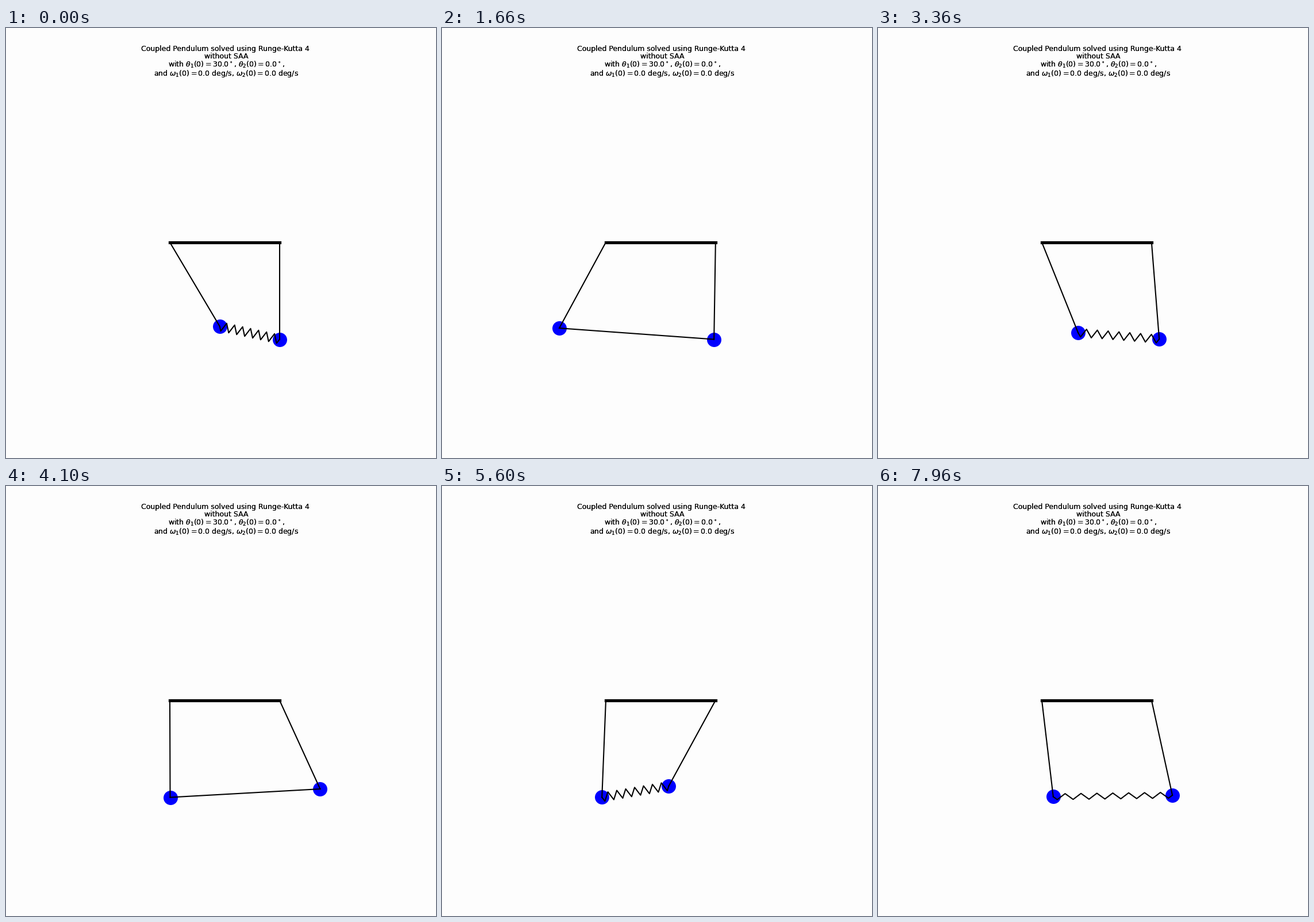
A matplotlib script that plays this animation: 748 px wide and 748 px high, repeating every 8000 ms.

```python
import numpy as np
import matplotlib.pyplot as plt
from matplotlib.animation import FuncAnimation

SIZE = 748
FPS, STATES = 30, 240        # rate and number of solved states
TICK, LOOP = 20, 8000        # ms
G, K = 3.0, 0.905            # g / length and spring constant / mass
GAP = 1.1                    # distance between the pivots, in rod lengths
NODES, WIRE = 15, 0.1        # coils of the spring and wire length per coil
BACK = "#fdfdfd"

# title lines with their baselines, in pixels from the top
TITLE = [("Coupled Pendulum solved using Runge-Kutta 4 ", 40.0),
         ("without SAA", 53.3),
         (r"with $\theta_1(0) = 30.0^\circ$, $\theta_2(0) = 0.0^\circ$,", 67.7),
         (r"and $\omega_1(0) = 0.0$ deg/s, $\omega_2(0) = 0.0$ deg/s", 83.5)]


def slope(state):
    a, b, va, vb = state
    pull = K * (np.sin(a) - np.sin(b))
    return np.array([va, vb,
                     -G * np.sin(a) - pull * np.cos(a),
                     -G * np.sin(b) + pull * np.cos(b)])


def rk4(state, dt):
    k1 = slope(state)
    k2 = slope(state + dt / 2 * k1)
    k3 = slope(state + dt / 2 * k2)
    k4 = slope(state + dt * k3)
    return state + dt / 6 * (k1 + 2 * k2 + 2 * k3 + k4)


def solve():
    states = [np.array([np.radians(30.0), 0.0, 0.0, 0.0])]
    for _ in range(STATES - 1):
        states.append(rk4(states[-1], 1 / FPS))
    return np.array(states)


def spring(start, end):
    """Zigzag of fixed wire length; it goes straight when overstretched."""
    span = end - start
    length = np.hypot(*span)
    normal = np.array([-span[1], span[0]]) / length
    height = np.sqrt(max(0.0, WIRE**2 - (length / NODES)**2)) / 2
    i = np.arange(1, NODES + 1)[:, None]
    coils = start + span * (2 * i - 1) / (2 * NODES) + height * (-1.0)**i * normal
    return np.vstack([start, coils, end])


angles = solve()[:, :2]
pivots = np.array([[0.0, 0.0], [GAP, 0.0]])

fig, ax = plt.subplots(figsize=(10, 10), dpi=SIZE / 10, facecolor=BACK)
fig.subplots_adjust(left=0.125, right=0.9, bottom=0.11, top=0.88)
ax.set_xlim(-1.1037, 2.2375)
ax.set_ylim(-1.7353, 1.6768)
ax.axis("off")

for text, base in TITLE:
    for _ in range(2):       # the second pass darkens the thin strokes
        fig.text(0.5125, 1 - base / SIZE, text, ha="center", va="baseline",
                 fontsize=12, family="DejaVu Sans")

bobs, = ax.plot([], [], "o", color="blue", ms=24, mew=0)
ax.plot(*pivots.T, color="black", lw=5)
rods = [ax.plot([], [], color="black", lw=2)[0] for _ in pivots]
coil, = ax.plot([], [], color="black", lw=2)


def update(tick):
    nearest = int(tick * TICK * FPS / 1000 + 0.5)
    theta = angles[nearest]
    ends = pivots + np.column_stack([np.sin(theta), -np.cos(theta)])
    bobs.set_data(*ends.T)
    for rod, top, end in zip(rods, pivots, ends):
        rod.set_data(*np.array([top, end]).T)
    coil.set_data(*spring(*ends).T)
    return [bobs, *rods, coil]


anim = FuncAnimation(fig, update, frames=LOOP // TICK, interval=TICK,
                     repeat=True, repeat_delay=0)
plt.show()
```
